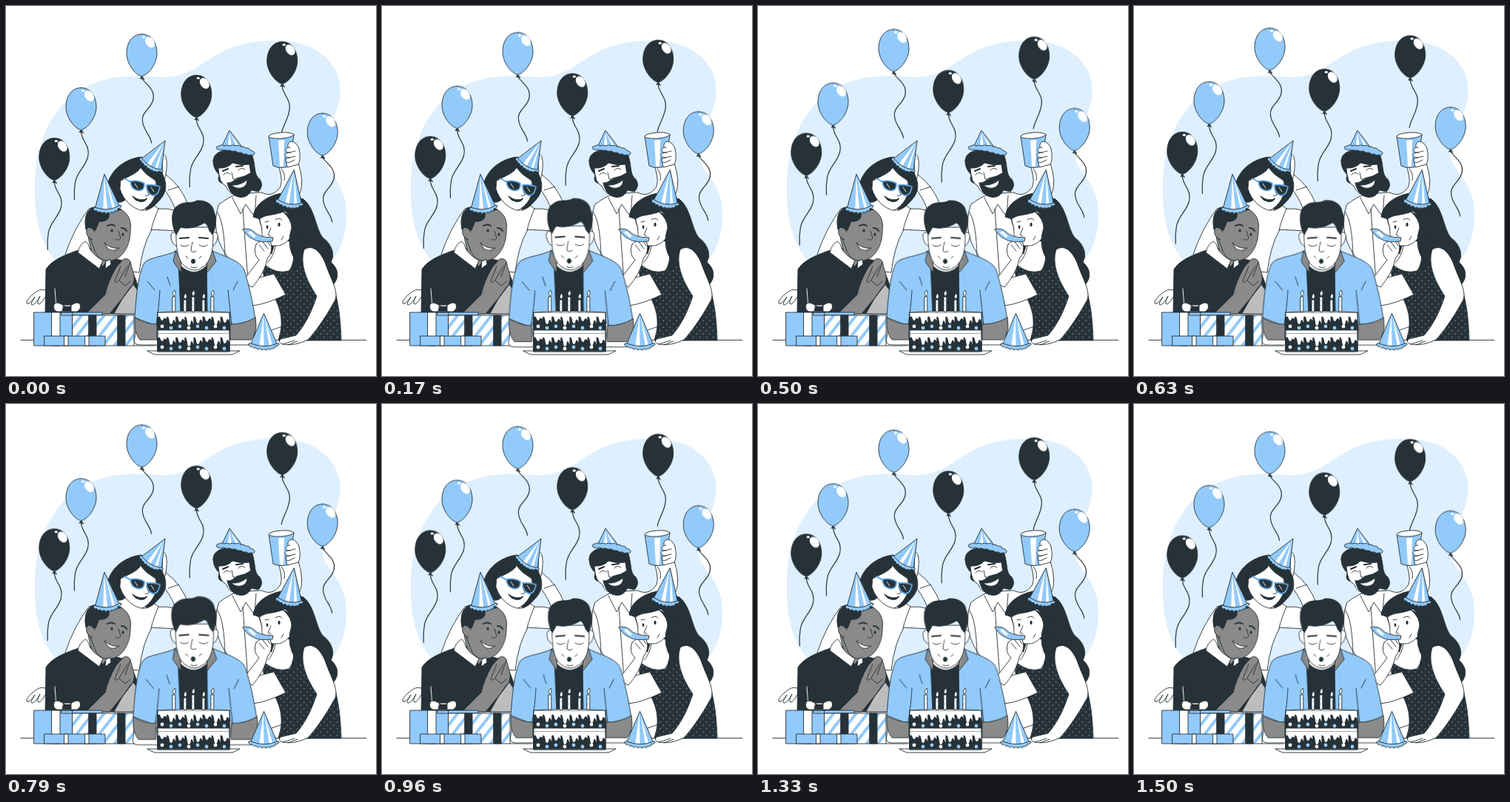
Write an HTML page that moves like this. It is 500 px wide and 500 px high and loops after 1540 ms.

```html
<!DOCTYPE html>
<html lang="en">
<head>
<meta charset="utf-8">
<title>Birthday party</title>
<style>
html,body{margin:0;width:100%;height:100%;overflow:hidden;background:#fff}
svg{display:block;width:100vw;height:100vh;stroke:#263238;stroke-width:.9;stroke-linejoin:round;stroke-linecap:round;fill:none}
.k{fill:#263238}.b{fill:#92cafb}.w{fill:#fff}.g{fill:#8a8a8a}.p{fill:#bdbdbd}
.n{stroke:none}.t{stroke-width:2}.l{stroke:#fff}
#man{transform-box:view-box;transform-origin:257px 361px}
</style>
</head>
<body>
<svg viewBox="0 0 500 500">
<defs>
  <g id="hat">
    <path class="b" d="M-17 0L0-46L17 0Q0 7-17 0Z"/>
    <path class="w n" d="M-.5-43L-6 3L0 4ZM1-41L7 3L11 2Z"/>
    <path class="b" d="M-19-1q1 5 4 3q2 4 5 2q2 4 5 1q3 4 5 1q3 3 5 0q3 2 5-1q4 1 4-3q5 0 5-4q-3-1-5 1Q0 5-16-2Q-18-4-19-1Z"/>
  </g>
  <g id="head">
    <path d="M0 0C14 0 20.5 13 20.5 26C20.5 40 9 55 0 57C-9 55-20.5 40-20.5 26C-20.5 13-14 0 0 0Z"/>
    <path class="k" d="M0 57L-2.5 60Q0 59 3 61Z"/>
    <ellipse class="w n" cx="11" cy="11" rx="5.6" ry="8" transform="rotate(-36 11 11)"/>
    <ellipse class="w n" cx="2.5" cy="4" rx="2.3" ry="1.6"/>
  </g>
  <pattern id="dots" width="9" height="9" patternUnits="userSpaceOnUse">
    <path class="k n" d="M0 0H9V9H0Z"/>
    <g fill="#66727a" stroke="none"><circle cx="2.2" cy="2.2" r="1"/><circle cx="6.7" cy="6.7" r="1"/></g>
  </pattern>
  <pattern id="stripes" width="12" height="12" patternUnits="userSpaceOnUse" patternTransform="rotate(38)">
    <path class="w n" d="M0 0H12V12H0Z"/><path class="b n" d="M0 0H4V12H0Z"/>
  </pattern>
</defs>

<path fill="#deeffe" stroke="none" d="M39 245C38 190 62 132 106 110C140 92 175 94 208 96C248 98 264 75 296 60C322 48 352 45 380 48C424 51 457 83 451 122C448 152 424 176 427 200C430 222 452 232 459 266C463 300 455 330 436 348L75 352C48 328 38 290 39 245Z"/>
<g id="balloons"></g>
<path d="M20 451.5H487"/>

<g id="sunglasses-woman">
  <path class="w" d="M212 200C218 201 218 213 216 228Q237 243 247 271L230 278Q224 260 211 244Z"/>
  <path d="M216 228L213 240M219 249L234 244"/>
  <path class="w" d="M112 274Q92 300 80 336L100 352L180 360Q184 325 197 302L232 304V277Q218 273 206 274L190 262H160Z"/>
  <path d="M206 274Q199 290 196 303"/>
  <path class="k" d="M182 204C158 207 140 224 137 243C134 254 140 260 146 262Q152 268 160 263L186 277Q198 274 206 264C216 254 219 243 212 228L206 215Z"/>
  <path class="w n" d="M160 262L166 286Q180 292 190 275Z"/>
  <path class="w" d="M155 236C166 230 178 226 182 218C188 228 196 231 202 236C207 252 198 269 184 276C172 275 158 262 154 247Z"/>
  <path d="M184 276Q194 277 202 268M190 247l3 8q-2 3-5 1"/>
  <path class="k" d="M171 257Q181 265 191 260Q187 266 180 264Q174 263 171 257Z"/>
  <path class="k" style="stroke:#5b9fd8;stroke-width:1.8" d="M168 237Q179 235 187 240Q187 251 177 249Q169 247 168 237ZM190 242Q199 241 208 244Q206 257 198 256Q190 253 190 242ZM160 233L169 238"/>
  <path class="l" d="M174 240L178 246M196 245L200 251"/>
  <use href="#hat" transform="translate(196 215) rotate(30) scale(.95 .83)"/>
</g>

<g id="bearded-man">
  <path class="w" d="M288 268Q302 257 314 254L345 252C356 257 362 254 368 248Q376 242 369 218L395 212Q404 240 396 256L385 300L382 430L330 448L300 340Q278 310 285 278Z"/>
  <path d="M285 278Q295 290 296 340M306 259L317 281L324 268L336 285L338 256M320 274L329 400M340 285Q346 295 348 315M376 236Q378 226 372 220"/>
  <path class="k" d="M280 210C280 198 292 194 307 194L332 200C338 214 334 228 343 234Q349 243 341 251L328 248L296 240Q284 240 288 228Q280 220 280 210Z"/>
  <path class="w" d="M287 219Q299 220 306 212Q318 216 329 214L332 236Q328 257 316 257Q301 255 297 243Q288 240 287 219Z"/>
  <path class="k" d="M299 239C306 240 309 233 318 231C326 230 328 225 332 226L334 240C332 256 322 260 314 258C305 256 301 248 299 239Z"/>
  <path class="w" d="M305 242Q316 243 326 235Q326 244 317 246Q309 247 305 242Z"/>
  <path d="M294 228q4-5 9-1M314 222q4-5 9-1M305 225l2 9q4 1 6-2"/>
  <path class="t" d="M293 223l7-3M311 217l9-1"/>
  <path class="b" d="M291 191L302 168L321 193Z"/>
  <path class="w n" d="M302 171L300 190L305 190ZM303 172L312 191L316 191Z"/>
  <path class="b" d="M285 193q-2-4 3-4q4-3 7 0q4-2 7 0q5-2 8 0q5-2 7 1q5-1 7 2q5-1 6 3q6 1 6 5q-2 3-5 1q-4 2-6-1q-5 1-7-2q-5 1-8-2q-5 1-8-1q-5 1-8-1q-6 2-9-1Z"/>
  <path class="b" d="M355 176L361 216Q373 221 383 216L389 174Z"/>
  <path class="w n" d="M368 181L370 217L375 217L376 181Z"/>
  <ellipse class="w" cx="372" cy="175" rx="17" ry="4" transform="rotate(-4 372 175)"/>
  <path class="w" d="M381 190Q380 184 386 183Q393 184 396 193Q399 207 395 214L380 218L378 208Z"/>
  <path class="w" d="M384 191q-6 0-6 4q0 3 5 3l8-2M384 198q-7 0-7 3q0 4 6 4l8-2M384 205q-6 0-6 4q1 4 6 2l6-3"/>
</g>

<g id="girl">
  <path class="k" d="M372 253C352 257 336 268 334 285L350 290L347 318L362 340L440 379C452 367 449 355 439 346C446 334 438 320 428 313C418 300 418 274 402 261Z"/>
  <path fill="url(#dots)" d="M350 350C345 358 348 368 356 381C368 402 375 418 371 440L368 452H453C452 425 450 398 440 372L411 327L388 335L372 358Z"/>
  <path class="w n" d="M363 318Q362 336 350 350Q366 363 382 358Q392 345 386 318Z"/>
  <path class="w" d="M343 288C350 281 362 284 377 277Q390 287 389 302C386 316 374 325 364 324C352 325 344 312 346 302Z"/>
  <path d="M364 324Q362 338 354 346M350 350Q366 363 382 358"/>
  <path class="k" d="M374 278Q386 288 386 300Q380 318 386 334Q394 346 384 358L404 344L397 290Z"/>
  <path class="k n" d="M369 298a1.6 2.6 0 1 1 .1 0ZM353 301a1.4 2.4 0 1 1 .1 0Z"/>
  <path d="M364 289q5-4 9 0M350 292l5-1M358 300l-4 9l4 2M372 316l3-5"/>
  <path class="w" d="M325 374Q328 392 334 405Q354 402 378 390L362 362L346 366Z"/>
  <path class="w" d="M338 322Q350 311 358 320Q361 332 353 342C350 357 342 369 333 380L319 373Q334 354 342 343Q333 335 338 322Z"/>
  <path d="M342 323l7 8M347 319l7 9M353 318l4 6"/>
  <path class="b" d="M320 302Q328 299 335 305Q342 313 361 313L360 318Q341 320 334 315Q326 312 320 302Z"/>
  <path class="w n" d="M330 304L338 311L335 313L327 306Z"/>
  <path class="w" d="M403 329C416 320 428 336 433 352C440 371 449 385 445 397C430 424 418 440 408 451Q390 460 374 457Q367 455 371 450L392 445C407 428 415 407 420 392C408 374 396 350 403 329Z"/>
  <path d="M374 457L390 452M381 458L394 453"/>
  <use href="#hat" transform="translate(383 266) rotate(8) scale(.99 .98)"/>
</g>

<g id="polo-man">
  <path class="w" d="M53 384q-7-3-16 5q-10 8-9 13q4 2 11-9q-8 12-3 11q5-2 10-12q-6 11-1 11q5-3 8-10"/>
  <path class="k" d="M110 326C85 334 62 342 54 356L53 416H176L181 388C175 365 168 350 158 344L140 340Z"/>
  <path class="p" d="M157 396L172 376L182 390L178 416H146Z"/>
  <path class="g" d="M111 312L116 334L131 352L139 340Z"/>
  <path class="g" d="M112 280C106 295 108 305 113 312L118 325C123 345 136 346 146 343C159 339 168 322 168 305C170 290 166 281 154 274H120Z"/>
  <path class="k" d="M108 302C104 282 112 271 124 271L156 275L139 280C141 289 133 292 126 291L121 303L113 304Z"/>
  <path class="g" d="M120 305Q114 296 109 301Q107 312 117 316"/>
  <path class="w" d="M107 318Q99 323 97 333L126 355L131 344Q114 335 111 322ZM135 345L134 355L142 349L141 343Z"/>
  <path class="k n" d="M143 306a1.5 2.3 0 1 1 .1 0ZM158 311a1.5 2.3 0 1 1 .1 0Z"/>
  <path d="M152 304l3 10q-3 4-7 1M135 319l-3 3"/>
  <path class="t" d="M137 297q5-3 10 0M156 300q5 0 7 4"/>
  <path class="w" d="M134 321Q143 329 153 327Q145 333 138 328Z"/>
  <path class="g" d="M149 353L159 342Q166 340 168 346L173 364Q174 376 168 380L158 394L140 416H108Q124 400 134 390Q138 372 149 353Z"/>
  <path d="M155 352L147 371Q148 376 153 370L164 352M153 371L161 378L168 372M168 346L161 366"/>
  <path class="l" d="M66 382L68 408"/>
  <use href="#hat" transform="translate(137 273) rotate(-5)"/>
</g>

<g id="gifts">
  <path class="b" d="M38 414H90V459H38ZM75 414H130V418H75Z"/>
  <path class="w" d="M62 414H73V459H62Z"/>
  <path class="w" d="M80 406Q68 398 65 403Q63 411 69 413H96Q102 410 100 403Q96 398 86 406ZM78 404H88V414H76Z"/>
  <path fill="url(#stripes)" d="M90 418H173V459H90Z"/>
  <path class="k" d="M112 418H122V459H112ZM151 418H161V459H151Z"/>
  <path class="b" d="M52 446H134V459H52Z"/>
  <path class="w" d="M79 446H84V459H79ZM107 446H112V459H107Z"/>
  <path d="M173 459H202"/>
</g>

<g id="man">
  <path class="w" d="M203 430L176 430L174 448Q171 458 181 458H208ZM304 430L337 430L336 448Q338 458 329 458H300Z"/>
  <path class="b" d="M230 331C214 339 194 339 187 347C179 360 176 390 174 421L203 432L211 414H297L305 432L337 424C333 398 328 376 322 357C317 344 296 339 279 331Z"/>
  <path class="k" d="M233 346L236 416H272L271 346Z"/>
  <path class="w" d="M236 340V351Q254 368 271 351V340Z"/>
  <path class="g" d="M229 331L226 345L237 361L236 343ZM279 331L284 345L271 361L272 343Z"/>
  <path class="g" d="M174 421L174 432Q175 444 181 451H204V430Q188 430 174 421ZM337 421L338 432Q337 444 331 451H303V430Q322 430 337 421Z"/>
  <path d="M208 384Q207 405 203 430M300 384Q302 405 305 430M191 372L201 384M313 372L307 384M218 366L222 378"/>
  <path class="w" d="M230 306Q222 304 223 313Q225 324 232 325ZM279 306Q287 304 286 313Q284 324 277 325Z"/>
  <path class="w" d="M230 299H279C282 328 277 344 267 352Q254 362 242 352C232 344 229 327 230 299Z"/>
  <path class="k" d="M230 309C222 294 223 274 232 270C240 263 250 268 258 263C270 262 280 268 281 278C286 288 283 300 279 309L275 304Q272 294 268 293C258 299 246 302 236 299Z"/>
  <path class="t" d="M235 314l12-1M261 313l12 1"/>
  <path d="M236 323q5 4 11 0M261 323q6 4 11 0M252 319q-2 8-2 12q4 3 7 0M246 341l-3-3M261 341l3-3M250 353q4 2 8 0"/>
  <ellipse class="k" cx="253" cy="345" rx="2.6" ry="3"/>
</g>

<g id="cake">
  <path class="w" d="M191 466H316L306 471H201Z"/>
  <g id="tiers"></g>
  <g id="candles"></g>
</g>
<use href="#hat" transform="translate(348.5 458) scale(1.08 .93)"/>
</svg>
<script>
const LOOP = 1540;
const $ = id => document.getElementById(id);

const curly = 'M0 60C8 70 19 76 15 90C11 102-1 106 1 118C3 132 12 136 13 147';
const swept = 'M0 60C1 73 13 78 9 94C5 108-6 114-8 128Q-10 140-9 151';
const short = 'M0 60C1 73 14 78 9 96C6 108 0 116-1 124';

const balloon = ([x, y, tone, string]) =>
  `<g transform="translate(${x} ${y})"><path stroke-width="1.2" d="${string}"/><use href="#head" class="${tone}"/></g>`;

$('balloons').innerHTML = [
  [183.5, 38, 'b', curly], [101.5, 110.5, 'b', swept], [65.3, 178.5, 'k', swept],
  [257.3, 93.5, 'k', swept], [373.2, 48.3, 'k', short], [427.7, 145, 'b', curly]
].map(balloon).join('');

// Dark sponge with icing running down in rounded drips.
function tier(y) {
  let icing = `M205 ${y}V${y + 5}`, dots = '';
  for (let i = 0; i < 8; i++) {
    const drop = 3 + i * 5 % 8;
    icing += `q3-2 4 ${drop}q2 4 4 0q1-${drop} 4.1 0V${y + 5}`;
    dots += `<circle class="${i % 3 ? 'b' : 'w'} n" cx="${211 + i * 12}" cy="${y + 18 + i % 2 * 2}" r="2.4"/>`;
  }
  return `<path class="k" d="M205 ${y}H302V${y + 23}H205Z"/><path class="w n" d="${icing}V${y}Z"/>${dots}`;
}
$('tiers').innerHTML = '<path class="w" d="M205 414Q253 411 302 414V467H205Z"/>' +
  tier(415) + tier(443) + '<path d="M205 414V467H302V414"/>';

$('candles').innerHTML = [227, 242, 253, 267, 279].map((x, i) => {
  const y = 390 + i % 2 * 4;
  return `<path class="w" d="M${x - 1.8} ${y + 3}h3.6V413h-3.6Z"/>
    <path stroke="#92cafb" d="M${x - 1} ${y + 9}l2-2m-2 9l2-2"/>
    <path class="w" d="M${x} ${y + 2}q-4-3 1-8q3 6-1 8Z"/>`;
}).join('');

function loop(id, steps) {
  $(id).animate(steps.map(([offset, transform]) => ({ offset, transform })),
    { duration: LOOP, iterations: Infinity });
}
const rest = 'scale(1)', beat = 'scale(1.03)';
loop('balloons', [[0, 'translateY(0px)'], [.5, 'translateY(-10px)'], [1, 'translateY(0px)']]);
loop('man', [[0, rest], [.1, beat], [.3, rest], [.4, rest], [.5, beat], [.6, rest], [1, rest]]);
</script>
</body>
</html>
```
